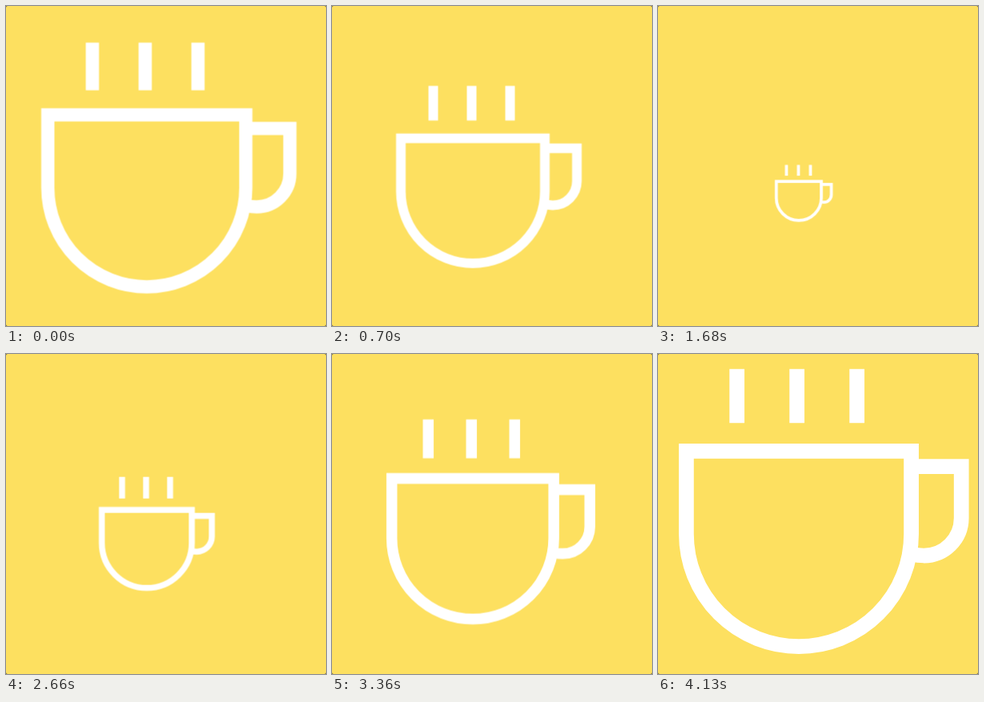
An HTML page for the animation above (4.2 s loop, 400x400 px).

```html
<!DOCTYPE html>
<html lang="en">
<head>
<meta charset="utf-8">
<title>Coffee cup sizes</title>
<style>
  html, body {
    margin: 0;
    width: 100%;
    height: 100%;
    overflow: hidden;
    background: #5c5228;
  }
  svg {
    display: block;
    width: 100%;
    height: 100%;
    background: #fde060;
    border-radius: 2px;
  }
  .cup {
    fill: none;
    stroke: #fff;
    stroke-width: 18.75;
    transform-origin: 176px 243.7px;
    animation: resize 4200ms step-end -4ms infinite;
  }
  /* The cup snaps from one size to the next, about every 200 ms */
  @keyframes resize {
    0%     { transform: scale(.88); }
    5%     { transform: scale(.8); }
    10%    { transform: scale(.72); }
    15%    { transform: scale(.64); }
    20%    { transform: scale(.6); }
    25%    { transform: scale(.5333); }
    30%    { transform: scale(.4); }
    33.33% { transform: scale(.2667); }
    38.33% { transform: scale(.2); }
    53.33% { transform: scale(.2667); }
    58.33% { transform: scale(.4); }
    65%    { transform: scale(.5333); }
    68.33% { transform: scale(.6); }
    73.33% { transform: scale(.64); }
    78.33% { transform: scale(.72); }
    81.66% { transform: scale(.8); }
    86.66% { transform: scale(.88); }
    91.66%, 100% { transform: scale(1); }
  }
</style>
</head>
<body>
<svg viewBox="0 0 400 400">
  <g class="cup">
    <path class="steam" d="M98.7 18.7v67.6M173.7 18.7v67.6M248.7 18.7v67.6"/>
    <path class="bowl" d="M35.4 121.4H316.6V225A140.6 140.6 0 0 1 35.4 225Z"/>
    <path class="handle" d="M317 140.6H379.2V205A47 47 0 0 1 332 252Q325 252 317 250"/>
  </g>
</svg>
</body>
</html>
```
